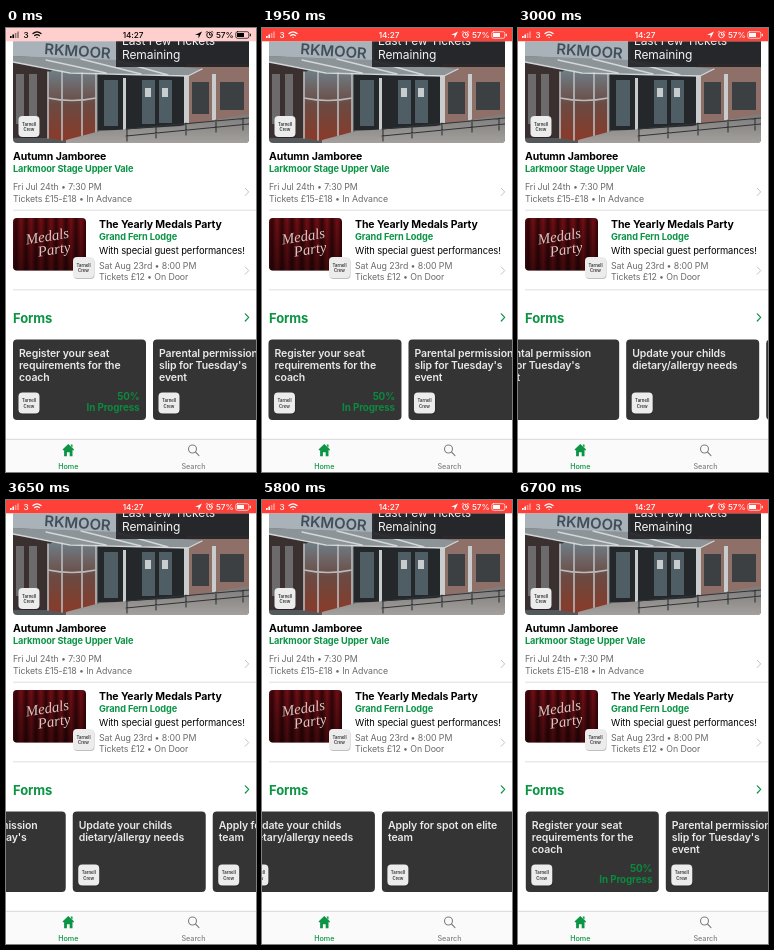
Write an HTML page that moves like this. It is 250 by 444 pixels and loops after 6.75 s.

```html
<!DOCTYPE html>
<html lang="en">
<head>
<meta charset="utf-8">
<style>
  html, body { margin: 0; height: 100%; overflow: hidden; background: #fff; }
  svg { display: block; width: 100vw; height: 100vh; font-family: Inter, Roboto, sans-serif; letter-spacing: -.1px; }
  .title { font-size: 10.5px; font-weight: 700; }
  .venue { font-size: 9.2px; font-weight: 700; fill: #0a9444; }
  .note { font-size: 9.4px; }
  .info { font-size: 8.8px; fill: #6b6b6e; }
  .heading { font-size: 13px; font-weight: 700; fill: #0a9444; }
  .card { font-size: 10.5px; font-weight: 600; fill: #e9e9e9; }
  .progress { font-size: 9.8px; font-weight: 700; fill: #0b8a3e; text-anchor: end; }
  .tab { font-size: 7.2px; font-weight: 500; text-anchor: middle; letter-spacing: 0; }
  .badge { font-size: 4.3px; font-weight: 600; fill: #333; text-anchor: middle; letter-spacing: 0; }
  .status { font-size: 8.2px; font-weight: 500; }
  .line { fill: none; stroke-linecap: round; stroke-linejoin: round; }
</style>
</head>
<body>
<svg viewBox="0 0 250 444">
  <defs>
    <clipPath id="photoClip"><rect x="7" y="-20" width="236" height="135" rx="4"/></clipPath>
    <clipPath id="curtainClip"><rect x="7" y="190" width="73" height="52.5" rx="4"/></clipPath>
    <linearGradient id="fold" x1="0" x2="5" gradientUnits="userSpaceOnUse" spreadMethod="reflect">
      <stop stop-color="#33060a"/><stop offset=".6" stop-color="#650c11"/><stop offset="1" stop-color="#7d1217"/>
    </linearGradient>
    <linearGradient id="shade" x2="0" y2="1">
      <stop stop-color="#000" stop-opacity=".1"/><stop offset="1" stop-color="#000" stop-opacity=".5"/>
    </linearGradient>
    <linearGradient id="paving" x2="0" y2="1">
      <stop stop-color="#7d7b7a"/><stop offset="1" stop-color="#a3a09d"/>
    </linearGradient>
    <linearGradient id="glass" x2="0" y2="1">
      <stop stop-color="#6f828c"/><stop offset=".5" stop-color="#6b4a42"/><stop offset="1" stop-color="#8a3a28"/>
    </linearGradient>
    <g id="badge">
      <rect x=".5" y="1" width="21" height="21" rx="4" fill="#000" opacity=".25"/>
      <rect width="21" height="21" rx="4" fill="#ececec"/>
      <text class="badge" x="10.5" y="9.8">Tarnell</text>
      <text class="badge" x="10.5" y="15">Crew</text>
    </g>
    <path id="chevron" class="line" d="M0 0l3.4 3.6L0 7.2"/>
  </defs>

  <g clip-path="url(#photoClip)">
    <path fill="#55585b" d="M0 0h250v120H0z"/>
    <path fill="#8e7069" d="M180 36h70v70h-70z"/>
    <path fill="#3a3030" d="M7 34h40v76H7z"/>
    <path fill="#6d6a6b" d="M10 46h8v50h-8zm13 0h8v52h-8z"/>
    <path fill="url(#glass)" d="M42 44q24-8 48 0v66q-24 6-48 0z"/>
    <path class="line" stroke="#b9bcbe" stroke-width="1.6" d="M42 44v66M56 42v70M76 42v70M90 44v66M42 70q24 5 48 0"/>
    <path fill="#25282b" d="M92 46h86v56H92z"/>
    <path fill="#4f5d64" d="M98 52h14v46H98zm38 0h13v44h-13zm17 0h13v43h-13z"/>
    <path fill="#c9cccd" d="M139 60h6v9h-6zm17 0h6v9h-6zM117 50h3v52h-3zM178 46h5v50h-5zM206 46h4v46h-4z"/>
    <path fill="#3c4042" d="M186 54h17v32h-17zm28 0h24v28h-24z"/>
    <path fill="url(#paving)" d="M60 112l34-9 80-5 69-12v29H60z"/>
    <path fill="#a9b2b8" d="M7 10h105v24L7 28z"/>
    <path fill="#8c9498" d="M7 28l105 4 84 9-14 7-118-4-57-10z"/>
    <path class="line" stroke="#d3d7d8" stroke-width="1.3" d="M7 34l57 11 118 3 14-7M40 32l60 13M75 31l60 15M112 33l50 14"/>
    <text x="38" y="26" font-size="15" font-weight="600" fill="#414f5c" transform="rotate(4 38 26)">RKMOOR</text>
    <path class="line" stroke="#303437" stroke-width="1.1" d="M120 101l123-11M120 108l123-12M121 100v13M150 98v12M180 95v12M210 92v12M237 90v12"/>
    <path fill="#222326" opacity=".92" d="M110 0h133v39H110z"/>
    <g font-size="12" fill="#f2f2f2"><text x="116" y="16.5">Last Few Tickets</text><text x="116" y="31">Remaining</text></g>
  </g>
  <use href="#badge" x="12.5" y="88"/>

  <text class="title" x="7" y="132">Autumn Jamboree</text>
  <text class="venue" x="7" y="144">Larkmoor Stage Upper Vale</text>
  <text class="info" x="7" y="161.7">Fri Jul 24th • 7:30 PM</text>
  <text class="info" x="7" y="173.5">Tickets £15-£18 • In Advance</text>
  <use href="#chevron" x="239.3" y="160.3" stroke="#c4c4c8"/>
  <path stroke="#d6d6d8" stroke-width=".8" d="M7 182.2h243M7 261.8h243"/>

  <g clip-path="url(#curtainClip)">
    <path fill="url(#fold)" d="M7 190h73v53H7z"/>
    <path fill="url(#shade)" d="M7 190h73v53H7z"/>
    <g font-family="'Liberation Serif', serif" font-style="italic" font-size="15" fill="#d8c6c4" transform="rotate(-9 43 218)">
      <text x="21" y="213">Medals</text><text x="31" y="227">Party</text>
    </g>
  </g>
  <use href="#badge" x="67" y="229"/>

  <text class="title" x="93" y="199.8">The Yearly Medals Party</text>
  <text class="venue" x="93" y="211.7">Grand Fern Lodge</text>
  <text class="note" x="93" y="226">With special guest performances!</text>
  <text class="info" x="93" y="241">Sat Aug 23rd • 8:00 PM</text>
  <text class="info" x="93" y="252">Tickets £12 • On Door</text>
  <use href="#chevron" x="239.3" y="239" stroke="#c4c4c8"/>

  <text class="heading" x="7" y="294.7">Forms</text>
  <use href="#chevron" x="239.3" y="285.8" stroke="#0a9444" stroke-width="1.2"/>
  <g id="cards"></g>

  <path fill="#fafafa" d="M0 411h250v33H0z"/>
  <path stroke="#c8c8ca" stroke-width=".7" d="M0 411.3h250"/>
  <path fill="#0a9444" d="M62.300 416l5.800 5.600-.9 1-.7-.6v6.200h-2.800v-4h-2.800v4h-2.800V422l-.7.6-.9-1zm2.600.5h1.600v3l-1.600-1.500z"/>
  <text class="tab" x="62.3" y="440.800" fill="#0a9444">Home</text>
  <g class="line" stroke="#808084" stroke-width="1.1"><circle cx="186.5" cy="421" r="4"/><path d="M189.5 424l3.500 3.600"/></g>
  <text class="tab" x="187.5" y="440.800" fill="#808084">Search</text>

  <path fill="#fff" d="M0 0h250v13.300H0z"/>
  <path id="bar" fill="#fd4038" d="M0 0h250v13.300H0z"/>
  <g id="status">
    <path fill="currentColor" d="M4 8h1.600v2H4zm2.400-1.500H8V10H6.400z"/>
    <path fill="currentColor" opacity=".45" d="M8.800 5h1.600v5H8.800zm2.400-1.500h1.600V10h-1.600z"/>
    <g class="status" fill="currentColor">
      <text x="17.500" y="9.800">3</text>
      <text x="127" y="9.800" text-anchor="middle">14:27</text>
      <text x="210" y="9.800">57%</text>
    </g>
    <g class="line" stroke="currentColor">
      <path stroke-width="1.200" d="M27 5.500q4-3.400 8 0M28.700 7.500q2.300-1.900 4.600 0M31 9.300v.1"/>
      <path stroke-width=".9" d="M203.500 5.500V7h1.200M200.300 4.200l1-1M206.700 4.200l-1-1"/>
      <circle stroke-width=".9" cx="203.500" cy="7" r="2.800"/>
      <rect stroke-width=".7" x="229.800" y="3.700" width="13" height="6.600" rx="1.700"/>
    </g>
    <path fill="currentColor" d="M189 7l7-3.500-3.500 7V7zM231 4.900h7v4.200h-7zM243.800 5.800h1v2.400h-1z"/>
  </g>
</svg>
<script>
const LOOP = 6750, STEP = 50, PITCH = 140, MAX_SCROLL = 317;
const FRICTION = 0.5;   // seconds for a coasting list to lose 1/e of its speed
const SPRING = 11.5;    // stiffness of the bounce at either end, per second
const [cards, bar, status_] = ['cards', 'bar', 'status'].map(id => document.getElementById(id));

const forms = [
  ['Register your seat', 'requirements for the', 'coach'],
  ['Parental permission', "slip for Tuesday's", 'event'],
  ['Update your childs', 'dietary/allergy needs'],
  ['Apply for spot on elite', 'team']
];
cards.innerHTML = forms.map((lines, i) => `<g transform="translate(${7 + i * PITCH} 311.500)">
  <rect width="133" height="80.500" rx="4" fill="#343435"/>
  ${lines.map((s, n) => `<text class="card" x="6" y="${17 + n * 12.3}">${s}</text>`).join('')}
  <use href="#badge" x="5.500" y="53"/>
  ${i ? '' : '<text class="progress" x="126.500" y="60">50%</text><text class="progress" x="126.500" y="71">In Progress</text>'}
</g>`).join('');

// Finger goes down at `start`, pulls the list `pull` px in `drag` s and lets go at `speed` px/s.
const swipes = [
  { start: 1930, drag: 0.2, pull: 37, speed: 344, dir: 1, stop: 3300 },
  { start: 3520, drag: 0.18, pull: 50, speed: 500, dir: 1, stop: 4500 },
  { start: 5750, drag: 0.15, pull: 85, speed: 1100, dir: -1, stop: LOOP }
];

function travel({ drag, pull, speed }, seconds, room) {
  if (seconds < drag) return pull * (seconds / drag) ** (speed * drag / pull);
  const coasting = seconds - drag, free = room - pull;
  const distance = speed * FRICTION * (1 - Math.exp(-coasting / FRICTION));
  if (distance < free) return pull + distance;
  const hit = -FRICTION * Math.log(1 - free / (speed * FRICTION));
  const since = coasting - hit;
  return room + (speed - free / FRICTION) * since * Math.exp(-SPRING * since);
}

function scrollAt(time) {
  let x = 0;
  for (const swipe of swipes) {
    if (time < swipe.start) break;
    const seconds = (Math.min(time, swipe.stop) - swipe.start) / 1000;
    x += swipe.dir * travel(swipe, seconds, swipe.dir > 0 ? MAX_SCROLL - x : x);
  }
  return x;
}

function draw() {
  const time = Math.floor(performance.now() % LOOP / STEP) * STEP;
  cards.setAttribute('transform', `translate(${-scrollAt(time)} 0)`);
  const fade = Math.min(1, 0.25 + time / 450);
  bar.setAttribute('opacity', fade);
  const ink = 255 * Math.max(0, (fade - 0.25) / 0.75);
  status_.style.color = `rgb(${ink}, ${ink}, ${ink})`;
  requestAnimationFrame(draw);
}
draw();
</script>
</body>
</html>
```
